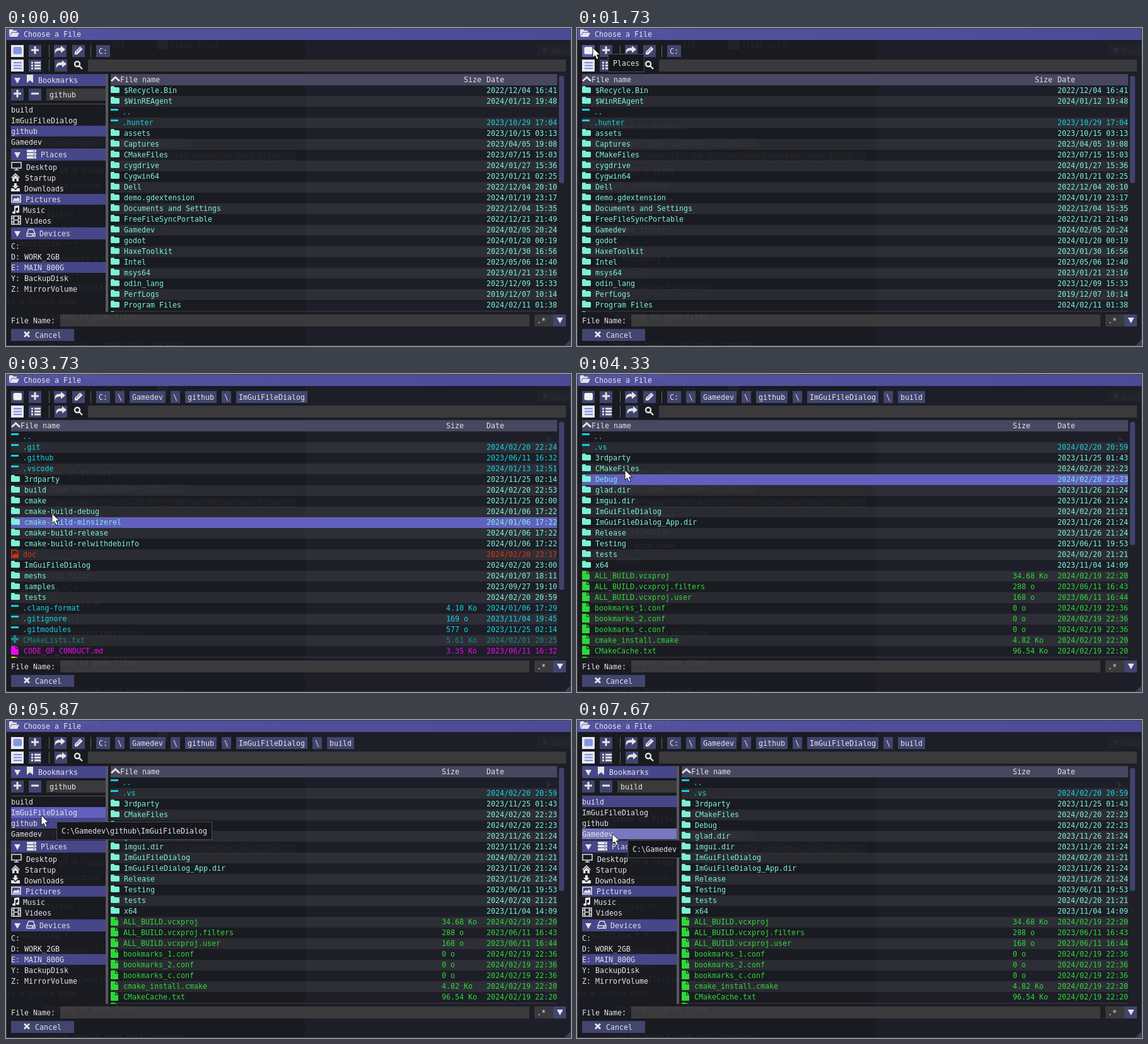
An HTML page for the animation above (8000 ms loop, 896 px wide and 504 px high).

```html
<!DOCTYPE html>
<html lang="en">
<head>
<meta charset="utf-8">
<title>File dialog</title>
<style>
  html, body { margin: 0; width: 100%; height: 100%; overflow: hidden; background: #1d1e27; }
  svg { display: block; }
  text { font: 11.63px "DejaVu Sans Mono", monospace; white-space: pre; }
</style>
</head>
<body>
<svg id="stage" width="896" height="504" viewBox="0 0 896 504"></svg>
<script>
const LOOP = 8000, TICK = 200 / 3, CW = 7;
const C = {
  text: '#e4e4e6', btn: '#41456f', btnHover: '#5c5ca8', input: '#3a3a3c', head: '#464689',
  hover: '#6260be', press: '#7977bd',
  dir: '#7cf2d4', hid: '#12d3e0', green: '#2fd63a', red: '#e2330f', pink: '#f008ee', teal: '#178a7e', yellow: '#e8e010'
};

// ---- drawing helpers; text takes the centre line of its row ----
const text = (x, c, s, fill = C.text) => `<text x="${x}" y="${c + 4}" fill="${fill}">${s}</text>`;
const rect = (x, y, w, h, fill, more = '') => `<rect x="${x}" y="${y}" width="${w}" height="${h}" fill="${fill}" ${more}/>`;
const path = (x, y, d, fill = C.text, more = '') => `<path transform="translate(${x} ${y})" d="${d}" fill="${fill}" ${more}/>`;
const line = (x, y, d, w = 2, col = C.text) => path(x, y, d, 'none', `stroke="${col}" stroke-width="${w}"`);
const group = (id, s = '') => `<g id="${id}">${s}</g>`;

const FOLDER = 'M0 1.5Q0 0 1.5 0H5L6.5 2H12.5Q14 2 14 3.5V9.5Q14 11 12.5 11H1.5Q0 11 0 9.5Z';
const FILE = 'M0 1Q0 0 1 0H7V5H12V13Q12 14 11 14H1Q0 14 0 13ZM8 0L12 4H8Z';
const DOWN = 'M-5 -4H5L0 5Z';
const SHARE = 'M0 13C-2 5 3 3 9 3.500V0L16 6L9 11.500V8C5 7.500 1 8 0 13Z';

// kind: [colour, name offset, icon]
const KIND = {
  d: [C.dir, 21, c => path(0, c - 7, FOLDER, C.dir)],
  h: [C.hid, 18.5, c => rect(0, c - 5, 12, 3, C.hid)],
  f: [C.green, 20, c => path(0, c - 8, FILE, C.green)],
  p: [C.pink, 20, c => path(0, c - 8, FILE, C.pink)],
  y: [C.yellow, 20, c => path(0, c - 8, FILE, C.yellow)],
  r: [C.red, 19, c => path(0, c - 8, 'M1 1H8L11 4V13H1ZM3 11L5 8L6.500 9.500L8 7.500L10 11Z', 'none', `stroke="${C.red}" stroke-width="1.6"`)],
  t: [C.teal, 19, c => path(0, c - 8, 'M4 0H8V4H12V8H8V12H4V8H0V4H4Z', C.teal)]
};

// kind|name|date|size
const LISTS = {
  root: { sizeX: 726, thumb: 170, crumbs: ['C:'], rows: `d|$Recycle.Bin|2022/12/04 16:41
d|$WinREAgent|2024/01/12 19:48
h|..|
h|.hunter|2023/10/29 17:04
d|assets|2023/10/15 03:13
d|Captures|2023/04/05 19:08
d|CMakeFiles|2023/07/15 15:03
d|cygdrive|2024/01/27 15:36
d|Cygwin64|2023/01/21 02:25
d|Dell|2022/12/04 20:10
d|demo.gdextension|2024/01/19 23:17
d|Documents and Settings|2022/12/04 15:35
d|FreeFileSyncPortable|2022/12/21 21:49
d|Gamedev|2024/02/05 20:24
d|godot|2024/01/20 00:19
d|HaxeToolkit|2023/01/30 16:56
d|Intel|2023/05/06 12:40
d|msys64|2023/01/21 23:16
d|odin_lang|2023/12/09 15:33
d|PerfLogs|2019/12/07 10:14
d|Program Files|2024/02/11 01:38
d||` },
  build: { sizeX: 691, thumb: 195, crumbs: ['C:', 'Gamedev', 'github', 'ImGuiFileDialog', 'build'], rows: `h|..|
h|.vs|2024/02/20 20:59
d|3rdparty|2023/11/25 01:43
d|CMakeFiles|2024/02/20 22:23
d|Debug|2024/02/20 22:23
d|glad.dir|2023/11/26 21:24
d|imgui.dir|2023/11/26 21:24
d|ImGuiFileDialog|2024/02/20 21:21
d|ImGuiFileDialog_App.dir|2023/11/26 21:24
d|Release|2023/11/26 21:24
d|Testing|2023/06/11 19:53
d|tests|2024/02/20 21:21
d|x64|2023/11/04 14:09
f|ALL_BUILD.vcxproj|2024/02/19 22:20|34.68 Ko
f|ALL_BUILD.vcxproj.filters|2023/06/11 16:43|288 o
f|ALL_BUILD.vcxproj.user|2023/06/11 16:44|168 o
f|bookmarks_1.conf|2024/02/19 22:36|0 o
f|bookmarks_2.conf|2024/02/19 22:36|0 o
f|bookmarks_c.conf|2024/02/19 22:36|0 o
f|cmake_install.cmake|2024/02/19 22:20|4.82 Ko
f|CMakeCache.txt|2024/02/19 22:20|96.54 Ko
f||` },
  repo: { sizeX: 698, thumb: 266, crumbs: ['C:', 'Gamedev', 'github', 'ImGuiFileDialog'], rows: `h|..|
h|.git|2024/02/20 22:24
h|.github|2023/06/11 16:32
h|.vscode|2024/01/13 12:51
d|3rdparty|2023/11/25 02:14
d|build|2024/02/20 22:53
d|cmake|2023/11/25 02:00
d|cmake-build-debug|2024/01/06 17:22
d|cmake-build-minsizerel|2024/01/06 17:22
d|cmake-build-release|2024/01/06 17:22
d|cmake-build-relwithdebinfo|2024/01/06 17:22
r|doc|2024/02/20 23:17
d|ImGuiFileDialog|2024/02/20 23:00
d|meshs|2024/01/07 18:11
d|samples|2023/09/27 19:10
d|tests|2024/02/20 20:59
h|.clang-format|2024/01/06 17:29|4.10 Ko
h|.gitignore|2023/11/04 19:45|169 o
h|.gitmodules|2023/11/25 02:14|577 o
t|CMakeLists.txt|2024/02/01 20:25|5.61 Ko
p|CODE_OF_CONDUCT.md|2023/06/11 16:32|3.35 Ko
y||` }
};

const MARKS = ['build', 'ImGuiFileDialog', 'github', 'Gamedev'];
const TIPS = ['C:\\Gamedev\\github\\ImGuiFileDialog\\build', 'C:\\Gamedev\\github\\ImGuiFileDialog', 'C:\\Gamedev\\github', 'C:\\Gamedev'];
const EDIT_TIP = 'Edit path\nYou can also right click on path buttons';
const BUTTONS = [[8, 27, 'Places'], [36, 27], [76, 27], [105, 27, EDIT_TIP], [36, 50], [77, 50]];
const HEADS = [73, 191, 316], HEAD_H = 19;

// ---- parts ----
function listParts(name) {
  const { sizeX, thumb, crumbs, rows } = LISTS[name];
  let names = '', cols = text(sizeX, 82, 'Size') + text(762, 82, 'Date');
  rows.split('\n').forEach((row, i) => {
    const [kind, label, date, size] = row.split('|'), c = 99 + 17 * i;
    const [col, dx, icon] = KIND[kind];
    names += icon(c) + text(dx, c, label, col);
    cols += text(762, c, date, col) + (size ? text(sizeX, c, size, col) : '');
  });
  let x = 143, bar = '';
  crumbs.join('|\\|').split('|').forEach(s => {
    const w = s.length * CW + 8;
    bar += rect(x, 27, w, 19, C.btn) + text(x + 4, 37, s);
    x += w + 8;
  });
  return {
    names: group(name + 'Names', names),
    rest: group(name + 'Rest', `<g clip-path="url(#body)">${cols}</g>` + bar + rect(877, 76, 8, thumb, '#40436e', 'rx="3"'))
  };
}

function ghosts() {
  const rows = [
    [0, 3, 'less FileSystem Boost'], [167, 27, '153'], [261, 27, 'clear color'], [865, 37, 'Demo'],
    [20, 157, 'Selections of filters'], [50, 182, 'of type regex ((Custom +[.]h))'],
    [50, 204, 'of type regex (([a-zA-Z0-9]+)) for extention less files'], [85, 226, 'of 6 items'], [36, 250, 'folder selection'],
    [92, 272, 'path.name'], [64, 296, 'filter *'], [50, 320, 'custom filter'], [22, 342, 'multiline *.*'], [70, 366, '*.vcxproj *'],
    [60, 388, '[*.vcol]'], [50, 411, 'filter collectionfilter'], [0, 434, 'in a custom pane'], [60, 457, 'mapping to glob files'], [50, 502, 'item to have a read only checkbox']
  ];
  return `<g opacity=".055">` + rows.map(r => text(...r, '#fff')).join('') +
    rect(240, 18, 17, 16, '#fff', 'opacity=".6"') + rect(0, 174, 284, 16, '#fff', 'opacity=".3"') + rect(0, 196, 459, 16, '#fff', 'opacity=".3"') +
    rect(842, 26, 54, 18, '#fff', 'opacity=".3"') + path(855, 36, DOWN, '#fff') + path(858, 103, 'M0 -5L7 0L0 5Z', '#fff') + '</g>';
}

const header = (c, x, label, icon) => path(18, c, DOWN) + text(x, c, label) + icon;

function panel() {
  const places = [[32, 'Desktop'], [30, 'Startup'], [29, 'Downloads'], [31, 'Pictures'], [27, 'Music'], [30, 'Videos']];
  const drives = ['C:', 'D: WORK_2GB', 'E: MAIN_800G', 'Y: BackupDisk', 'Z: MirrorVolume'];
  const server = [0, 5, 10].map(y => rect(33, 193 + y, 15, 4, C.text, 'rx="1"') + rect(43, 194.5 + y, 3, 1, C.head)).join('');
  const film = line(9, 298, 'M0 0H14V13H0ZM3.500 0V13M10.500 0V13M3.500 6.500H10.500M0 3.500H3.500M0 9.500H3.500M10.500 3.500H14M10.500 9.500H14', 1.5);
  return HEADS.map((y, i) => rect(8, y, 150, HEAD_H, C.head, `id="head${i}"`)).join('') +
    header(83, 51, 'Bookmarks', path(33, 74, 'M0 0H10V13L5 9L0 13Z')) +
    header(201, 55, 'Places', server) +
    header(326, 53, 'Devices', line(33, 318, 'M0 8L3 1H10L13 8V12H0ZM0 8H13M8 10H11', 1.4)) +
    rect(8, 96, 20, 19, C.btn) + rect(36, 96, 20, 19, C.btn) + rect(64, 96, 94, 19, C.input) +
    line(18, 104, 'M-6 0H6M0 -6V6', 3) + line(46, 104, 'M-6 0H6', 3) +
    '<g clip-path="url(#field)"><text id="markName" x="69" y="110" fill="' + C.text + '"></text></g>' +
    rect(8, 120, 150, 1, '#55555f') +
    rect(8, 121, 150, 17, C.head, 'id="markSel"') + rect(8, 121, 150, 17, C.hover, 'id="markHover"') +
    MARKS.map((s, i) => text(8, 130 + 17 * i, s)).join('') +
    rect(8, 263, 150, 17, C.head) + rect(8, 371, 150, 17, C.head) +
    places.map(([x, s], i) => text(x, 221 + 17 * i, s)).join('') +
    line(9, 213, 'M0 0H15V9H0ZM4 12H11M7.500 9V12', 1.5) +
    path(8, 230, 'M0 7L7 0L14 7L13 8L7 2.500L1 8ZM2 8L7 3.500L12 8V13H8.500V9H5.500V13H2Z') +
    path(8, 246, 'M5 0H9V4H12L7 9L2 4H5ZM0 8H4L7 11L10 8H14V13H0Z') +
    line(9, 265, 'M0 0H14V11H0Z', 1.6) + path(9, 265, 'M2 9.500V7L5 4L7 6L10 3L12.500 6V9.500Z') +
    path(9, 281, 'M4 1L12 0V10A2.500 2 0 1 1 10 8V3.500L6 4.500V11A2.500 2 0 1 1 4 9.500Z') + film +
    drives.map((s, i) => text(8, 346 + 17 * i, s)).join('') +
    rect(158, 73, 4, 377, '#57575f');
}

function chrome() {
  return rect(0, 0, 896, 19, 'url(#bar)') + path(5, 2, 'M0 11V1.500Q0 0 1.500 0H5L6.500 2H12V4.500H4L1 10ZM4.500 5.500H16L13 12H0.500Z') + text(28, 10, 'Choose a File') +
    BUTTONS.map(([x, y], i) => rect(x, y, 20, 19, C.btn, `id="btn${i}"`)).join('') +
    rect(11.5, 30, 13.5, 11.5, C.text, 'rx="2.500" id="placesIcon"') +
    line(46, 35, 'M-6 0H6M0 -6V6', 3) + path(78, 28, SHARE) + path(80, 51, SHARE) +
    path(109, 29, 'M0 13V9L8.500 0.500L12.500 4.500L4 13Z') + line(115, 35, 'M-4 4L3 -3', 1, C.btn) +
    rect(68, 27, 1, 19, '#606068') + rect(68, 50, 1, 19, '#606068') + rect(134, 27, 1, 19, '#606068') +
    rect(8, 50, 20, 19, '#e6e8f2') + line(12, 55, 'M0 0H13M0 4.500H13M0 9H13', 2, '#7f90dc') +
    line(40, 55, 'M0 0H3M5 0H15M0 4.500H3M5 4.500H15M0 9H3M5 9H15', 3) +
    line(113, 57, 'M4 0A4 4 0 1 1 -4 0A4 4 0 1 1 4 0M3 3L8 8', 2.4) +
    rect(130, 50, 758, 19, C.input) +
    text(8, 464, 'File Name:') + rect(86, 454, 744, 19, C.input) + rect(838, 454, 30, 19, C.input) + text(842, 464, '.*') +
    rect(868, 454, 20, 19, C.btn) + path(878.5, 463, DOWN) +
    rect(8, 477, 100, 19, C.btn) + line(33, 485.5, 'M-4 -4L4 4M4 -4L-4 4', 3) + text(46, 487, 'Cancel') +
    path(896, 504, 'M0 0V-11L-11 0Z', '#3e4152') + rect(0.5, 0.5, 895, 503, 'none', 'stroke="#3e3e4a"');
}

const stage = document.getElementById('stage');
const parts = Object.keys(LISTS).map(listParts);
const stripes = Array.from({ length: 11 }, (_, i) => rect(8, 108 + 34 * i, 866, 17, '#fff', 'opacity=".07"')).join('');
stage.innerHTML = `<defs>
  <clipPath id="body"><rect id="bodyRect" x="8" y="73" width="866" height="377"/></clipPath>
  <clipPath id="field"><rect x="64" y="96" width="94" height="19"/></clipPath>
  <linearGradient id="bar"><stop stop-color="#52529f"/><stop offset="1" stop-color="#4b4b96"/></linearGradient></defs>` +
  rect(0, 0, 896, 504, '#1d1e27') + rect(0, 0, 474, 504, '#1a1b21') +
  `<g clip-path="url(#body)">${stripes}${rect(8, 73, 866, 18, '#47475f')}</g>` +
  chrome() + ghosts() +
  `<g clip-path="url(#body)">${rect(8, 0, 866, 17, C.hover, 'id="rowHover"')}` +
  group('names', line(1, 77, 'M0 7L6.500 1L13 7', 3) + text(15, 82, 'File name') + parts.map(p => p.names).join('')) + '</g>' +
  rect(875, 73, 13, 377, '#1f2027') + parts.map(p => p.rest).join('') + group('panel', panel()) + group('tip') +
  path(0, 0, 'M0 0V16L3.700 12.700L6.400 18.700L9.200 17.500L6.600 11.600H11.500Z', '#fff', 'id="cursor" stroke="#111" stroke-width="1"');

const el = id => document.getElementById(id);
const set = (id, attrs) => { for (const a in attrs) el(id).setAttribute(a, attrs[a]); };
const show = (id, on) => set(id, { display: on ? 'inline' : 'none' });

// ---- timeline, in ticks ----
const MOVES = [
  [0, 920, 520], [1, 886, 488], [2, 560, 281], [6, 560, 281], [7, 330, 215], [8, 140, 130], [9, 100, 118], [13, 100, 118],
  [14, 68, 102], [18, 50, 66], [22, 25, 31], [44, 25, 31], [46, 111, 32], [50, 111, 32], [51, 106, 48], [53, 82, 180], [55, 72, 240],
  [58, 74, 184], [59, 74, 184], [61, 76, 165], [64, 76, 165], [65, 76, 152], [67, 5, 46], [69, 5, 46], [73, 22, 34], [81, 25, 31], [82, 25, 31],
  [87, 56, 151], [99, 56, 151], [100, 55, 132], [106, 55, 132], [112, 56, 180], [120, 56, 180]
];
function pointer(k) {
  const i = Math.max(1, MOVES.findIndex(m => m[0] >= k));
  const [a, x0, y0] = MOVES[i - 1], [b, x1, y1] = MOVES[i], u = Math.max(0, (k - a) / (b - a));
  return [Math.round(x0 + (x1 - x0) * u), Math.round(y0 + (y1 - y0) * u)];
}
const during = (k, ...spans) => spans.some(([a, b]) => k >= a && k < b);

function tooltip(label, x, y) {
  if (!label) return '';
  const lines = label.split('\n'), w = Math.max(...lines.map(s => s.length)) * CW + 16;
  return rect(x + 24.5, y + 10.5, w - 1, lines.length * 13 + 15, '#16171c', 'stroke="#4c4c58"') +
    lines.map((s, i) => text(x + 32, y + 25 + 13 * i, s)).join('');
}

function draw(k) {
  const open = !during(k, [26, 77]);
  const dir = k < 56 ? 'root' : during(k, [56, 59], [93, 106]) ? 'repo' : 'build';
  const mark = k < 93 ? 2 : k < 106 ? 1 : 0;
  const pressed = during(k, [90, 92], [95, 97], [104, 106], [115, 120]);
  const left = open ? 166 : 8;

  for (const name in LISTS) {
    show(name + 'Names', name === dir);
    show(name + 'Rest', name === dir);
  }
  set('bodyRect', { x: left, width: 874 - left });
  set('names', { transform: `translate(${left} 0)` });
  show('panel', open);
  set('markSel', { y: 121 + 17 * mark });
  el('markName').textContent = MARKS[mark];

  // hover follows the pointer one tick late
  const [px, py] = pointer(Math.max(0, k - 1));
  const side = open && px >= 8 && px < 158;
  const item = side ? Math.floor((py - 121) / 17) : -1, onMark = item >= 0 && item < 4;
  const row = px >= left && px < 874 && py >= 91 && py < 450;
  let label = onMark ? TIPS[item] : '';
  BUTTONS.forEach(([x, y, tip], i) => {
    const over = px >= x && px < x + 20 && py >= y && py < y + 19;
    set('btn' + i, { fill: !i && open ? '#e6e8f2' : over ? C.btnHover : C.btn });
    if (over && tip) label = tip;
  });
  set('placesIcon', { fill: open ? '#8496e2' : '#f0f0f2' });
  HEADS.forEach((y, i) => set('head' + i, { fill: side && py >= y && py < y + HEAD_H ? C.hover : C.head }));
  show('markHover', onMark);
  set('markHover', { y: 121 + 17 * item, fill: pressed ? C.press : C.hover });
  show('rowHover', row);
  set('rowHover', { y: 91 + 17 * Math.floor((py - 91) / 17) });
  el('tip').innerHTML = tooltip(label, px, py);
  set('cursor', { transform: `translate(${pointer(k).join(' ')})` });
}

let last = -1;
const start = performance.now();
function frame() {
  const t = (performance.now() - start) % LOOP;
  const k = Math.min(119, Math.floor((t + 3.4) / TICK));
  if (k !== last) draw(last = k);
  requestAnimationFrame(frame);
}
frame();
</script>
</body>
</html>
```
